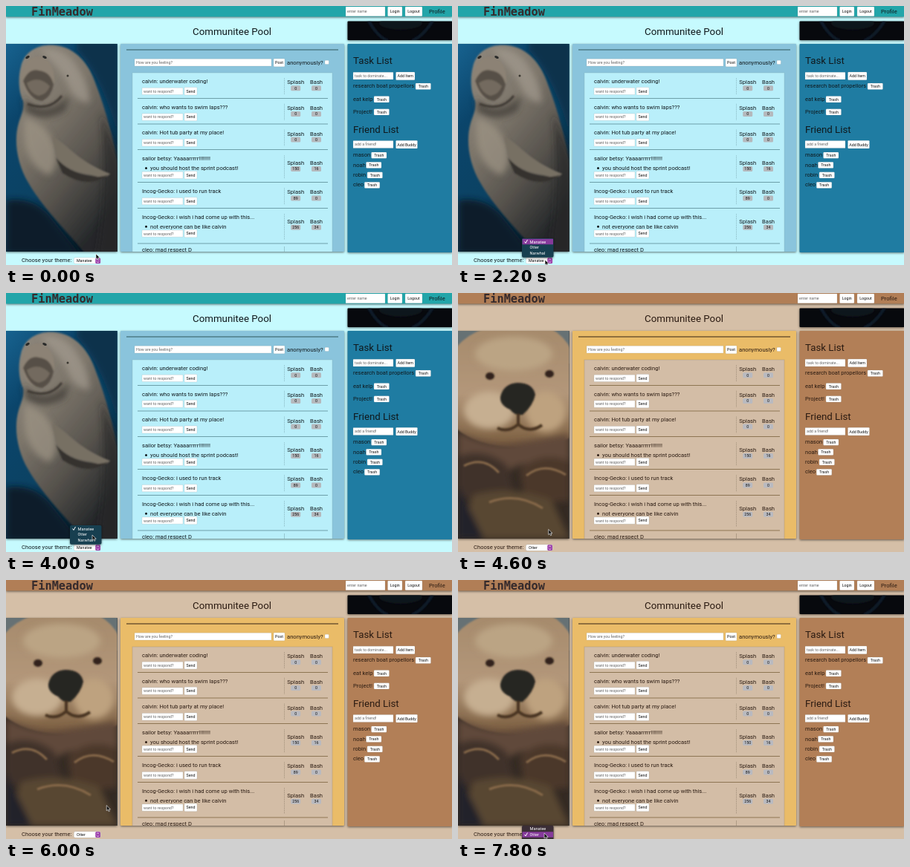
Recreate the animation shown at these times as an HTML page. Size 600x349 px, loop 8000 ms.

```html
<!DOCTYPE html>
<html lang="en">
<head>
<meta charset="utf-8">
<title>Animal themes</title>
<style>
html, body { margin: 0; width: 100%; height: 100%; overflow: hidden; }
svg { display: block; width: 100%; height: 100%; font-family: Roboto, sans-serif;
  --page: #c6fafe; --bar: #22a5a9; --pool: #8ac4dc; --feed: #b9effa; --side: #1f7ca2;
  --ink: #10191d; --rule: #4d7d87; --line: #7eabb5; --badge: #b5b9bd; --menu: #173f50; }
svg.otter {
  --page: #d5bfa7; --bar: #b17e56; --pool: #eabc68; --feed: #d3bda6; --side: #b27f57;
  --ink: #2b1b12; --rule: #705630; --line: #96836f; --badge: #b9bac0; --menu: #3b2e36; }
text { fill: var(--ink); font-size: 7.6px; white-space: pre; }
.title { font-size: 13.3px; }
.small { font-size: 5.3px; fill: #111; }
.hint { font-size: 5.3px; fill: #666; }
.brand { font: bold 15.3px "DejaVu Sans Mono", monospace; fill: #352a2c; }
.item { font-size: 5.6px; fill: #fff; }
.box { fill: #fff; stroke: #8b979b; stroke-opacity: .4; stroke-width: .5; }
.panel { filter: drop-shadow(0 1px 1.5px #0008); }
.otter #manatee, svg:not(.otter) #otter { display: none; }
</style>
</head>
<body>
<svg id="stage" viewBox="0 0 600 349" preserveAspectRatio="none">
  <defs>
    <clipPath id="photoClip"><path d="M0 51H149.500V331H0z"/></clipPath>
    <clipPath id="poolClip"><path d="M154 51H455V331H154z"/></clipPath>
    <clipPath id="stripClip"><rect x="459.500" y="20.500" width="141" height="25.500" rx="1"/></clipPath>
    <filter id="soft" x="-30%" y="-30%" width="160%" height="160%"><feGaussianBlur stdDeviation="4"/></filter>
    <filter id="edge"><feGaussianBlur stdDeviation=".8"/></filter>
    <linearGradient id="water" x2=".6" y2="1">
      <stop stop-color="#17628f"/><stop offset=".3" stop-color="#0b456b"/>
      <stop offset=".65" stop-color="#0b4263"/><stop offset="1" stop-color="#071a26"/>
    </linearGradient>
    <linearGradient id="hide" x2=".6" y2="1">
      <stop stop-color="#8f887d"/><stop offset=".4" stop-color="#7d766b"/>
      <stop offset=".7" stop-color="#57534d"/><stop offset="1" stop-color="#25282a"/>
    </linearGradient>
    <linearGradient id="fur" x2="0" y2="1">
      <stop stop-color="#a58a6b"/><stop offset=".55" stop-color="#b3977a"/><stop offset="1" stop-color="#775a3c"/>
    </linearGradient>
  </defs>

  <rect width="600" height="349" style="fill:var(--page)"/>
  <rect class="panel" width="600" height="14.500" style="fill:var(--bar)"/>

  <rect class="panel" y="51" width="149.500" height="280" fill="#083b5c"/>
  <g clip-path="url(#photoClip)">
    <g id="manatee">
      <path d="M0 51H150V331H0z" fill="url(#water)"/>
      <g filter="url(#soft)">
        <path d="M95 45H155V190Q130 95 95 60z" fill="#08304c"/>
        <path d="M0 262Q40 255 65 290L100 335H0z" fill="#081d2a"/>
      </g>
      <g filter="url(#edge)">
        <path d="M20 82C25 58 48 51 66 53C94 56 112 78 121 106C134 139 145 180 150 215V335H108C82 304 48 270 30 238C15 213 10 181 17 158C20 148 25 139 23 128C17 116 16 97 20 82z" fill="url(#hide)"/>
      </g>
      <g filter="url(#soft)">
        <path d="M45 58Q78 53 96 82T112 130Q93 130 84 108T45 58z" fill="#a39b8f" opacity=".7"/>
        <path d="M25 150Q58 160 66 190Q72 216 58 228Q18 211 25 150z" fill="#9c9385" opacity=".75"/>
        <path d="M128 145L155 210V335H122Q137 255 128 145z" fill="#25282a" opacity=".6"/>
        <path d="M23 124Q52 154 86 119L80 141Q52 159 27 143z" fill="#3d3933" opacity=".7"/>
      </g>
      <g filter="url(#edge)">
        <ellipse cx="43" cy="97" rx="22" ry="29" fill="#8c8275"/>
        <path d="M23 101Q31 83 45 87Q60 89 64 106Q61 122 49 128Q32 128 23 101z" fill="#575047"/>
        <path d="M28 104Q44 93 59 108Q55 119 44 121Q32 118 28 104z" fill="#736a5f"/>
        <path d="M29 132Q58 143 75 121" fill="none" stroke="#403b35" stroke-width="3"/>
        <path d="M62 176C83 185 92 207 140 226Q135 234 115 228Q83 224 68 204z" fill="#777064"/>
        <path d="M67 204Q83 225 115 229Q128 232 138 227Q111 248 76 225z" fill="#35332f"/>
      </g>
      <ellipse cx="29" cy="69" rx="3" ry="1.600" fill="#292a29" transform="rotate(-30 29 69)"/>
      <ellipse cx="52" cy="69" rx="3" ry="1.600" fill="#292a29" transform="rotate(25 52 69)"/>
      <circle cx="83" cy="94" r="1.500" fill="#393630"/>
    </g>
    <g id="otter">
      <path d="M0 51H150V331H0z" fill="#342a23"/>
      <path d="M0 51H150V95H0z" fill="#667174"/>
      <path d="M-5 76Q18 48 55 44H115Q146 54 158 90V190Q125 214 78 208Q22 207-5 180z" fill="url(#fur)" filter="url(#edge)"/>
      <g filter="url(#soft)">
        <ellipse cx="75" cy="82" rx="52" ry="23" fill="#bba484"/>
        <ellipse cx="42" cy="158" rx="34" ry="25" fill="#c6af91"/>
        <ellipse cx="118" cy="160" rx="27" ry="27" fill="#bea27f"/>
        <path d="M0 186Q38 207 75 202T150 190V235Q95 222 72 237T0 222z" fill="#60493a"/>
        <path d="M0 220Q35 207 66 232L75 270Q35 293 0 270z" fill="#413329"/>
        <path d="M83 237Q115 211 150 227V280Q111 285 88 269z" fill="#4c3929"/>
        <path d="M20 272Q72 258 126 279L150 331H0z" fill="#594633"/>
        <path d="M0 260L35 331H0z" fill="#20242a"/>
      </g>
      <g filter="url(#edge)">
        <path d="M57 140Q61 122 80 121Q101 121 104 137Q101 152 87 164Q77 166 70 157Q56 151 57 140z" fill="#282523"/>
        <path d="M81 163V177M53 182Q67 189 81 177Q96 190 113 178" fill="none" stroke="#493522" stroke-width="4"/>
        <ellipse cx="43" cy="112" rx="6" ry="5" fill="#30241b"/>
        <ellipse cx="123" cy="109" rx="6" ry="5" fill="#30241b"/>
        <path d="M8 233Q34 219 55 242M92 246Q116 227 145 245M42 282Q79 268 114 290" fill="none" stroke="#87694a" stroke-width="3"/>
      </g>
    </g>
  </g>

  <rect class="panel" x="459.500" y="20.500" width="141" height="25.500" rx="1" fill="#07090d"/>
  <g clip-path="url(#stripClip)" filter="url(#edge)">
    <path d="M488 20Q500 42 514 47M574 20Q561 41 546 47" fill="none" stroke="#111a2a" stroke-width="4"/>
    <ellipse cx="531" cy="23" rx="29" ry="9" fill="#11121a"/>
  </g>
  <rect class="panel" x="154" y="51" width="301" height="280" rx="1" style="fill:var(--pool)"/>
  <rect class="panel" x="459.500" y="51" width="141" height="281" rx="1" style="fill:var(--side)"/>
  <g id="page"></g>
  <g id="menu">
    <rect class="panel" x="86" y="313" width="42.500" height="25.800" rx="2" style="fill:var(--menu)"/>
    <rect id="highlight" x="86.500" width="41.500" height="7.500" fill="#863a9b"/>
    <g id="items"></g>
    <path id="check" d="M89.500 317.500l1.500 2 2.500-4.500" fill="none" stroke="#fff"/>
  </g>
  <path id="cursor" d="M0 0V7.200L1.700 5.700 2.900 8.300 4.200 7.700 3 5.200H5.300z" fill="#111" stroke="#fff" stroke-width=".6"/>
</svg>
<script>
const $ = id => document.getElementById(id);
const text = (x, y, words, cls = '', anchor = 'start') =>
  `<text x="${x}" y="${y}" class="${cls}" text-anchor="${anchor}">${words}</text>`;
const box = (x, y, w, h, r = 1) =>
  `<rect class="box" x="${x}" y="${y}" width="${w}" height="${h}" rx="${r}"/>`;
const field = (x, y, w, h, hint) => box(x, y, w, h, .5) + text(x + 2, y + h / 2 + 1.9, hint, 'hint');
const button = (x, y, w, h, label) =>
  box(x, y, w, h) + text(x + w / 2, y + h / 2 + 1.9, label, 'small', 'middle');
const rule = (x1, y1, x2, y2, color, extra = '') =>
  `<path d="M${x1} ${y1}L${x2} ${y2}" style="stroke:var(--${color});${extra}"/>`;

function counter(x, y, label, value) {
  return text(x, y, label, '', 'middle') +
    `<rect x="${x - 6.5}" y="${y + 2}" width="13" height="7" rx="1.5" style="fill:var(--badge)"/>` +
    text(x, y + 7.4, value, 'small', 'middle');
}

function post({ y, words, splash, bash, reply, end }) {
  const inputY = y + (reply ? 15 : 6.2), countY = y + (reply ? 5.8 : 1.2);
  return text(183, y, words) +
    (reply ? `<circle cx="188.500" cy="${y + 10.2}" r="1.500" style="fill:var(--ink)"/>` + text(194, y + 12.6, reply) : '') +
    field(183, inputY, 55, 9.3, 'want to respond?') + button(240, inputY - .7, 17, 10.5, 'Send') +
    rule(374.5, y - 7, 374.5, end - 5, 'line', 'stroke-width:.6;stroke-dasharray:1 .5') +
    counter(389.7, countY, 'Splash', splash) + counter(417.5, countY, 'Bash', bash) +
    rule(177, end, 433, end, 'rule', 'stroke-width:.7');
}

const posts = [
  { y: 104, end: 124.5, words: 'calvin: underwater coding!', splash: 0, bash: 0 },
  { y: 138.7, end: 159, words: 'calvin: who wants to swim laps???', splash: 0, bash: 0 },
  { y: 173.4, end: 193.5, words: 'calvin: Hot tub party at my place!', splash: 0, bash: 0 },
  { y: 208.2, end: 237.5, words: 'sailor betsy: Yaaaarrrrr!!!!!!!!', splash: 150, bash: 16, reply: 'you should host the sprint podcast!' },
  { y: 252.2, end: 272.5, words: 'Incog-Gecko: i used to run track', splash: 89, bash: 0 },
  { y: 287, end: 320, words: 'Incog-Gecko: i wish i had come up with this...', splash: 256, bash: 34, reply: 'not everyone can be like calvin' }
];
const entries = [
  ['research boat propellors', 110.3, 551], ['eat kelp', 127.8, 495], ['Project!', 145, 495],
  ['mason', 203.2, 491.5], ['noah', 216.5, 484.5], ['robin', 230, 486], ['cleo', 243.4, 482.3]
];

$('page').innerHTML =
  text(34, 13, 'FinMeadow', 'brand') +
  field(457, 1, 53, 12.7, 'enter name') + button(513.5, 1, 19.5, 12.7, 'Login') +
  button(537, 1, 23, 12.7, 'Logout') + text(569, 10, 'Profile') +
  text(304, 39, 'Communitee Pool', 'title', 'middle') +
  rule(162, 59, 447, 59, 'rule', 'stroke-width:1.3') +
  field(173, 71.3, 184, 9.7, 'How are you feeling?') + button(360, 71, 15, 10.8, 'Post') +
  text(378, 79, 'anonymously?') + box(429, 73.2, 5.3, 5.3) +
  `<g clip-path="url(#poolClip)">
    <rect x="170" y="90" width="269" height="245" style="fill:var(--feed);stroke:var(--line);stroke-opacity:.35"/>` +
    posts.map(post).join('') + text(183, 331, 'cleo: mad respect D') +
    rule(374.5, 324, 374.5, 331, 'line', 'stroke-width:.6') + '</g>' +
  text(467, 78.3, 'Task List', 'title') + field(467, 89.3, 54, 9.8, 'task to dominate...') +
  button(524.5, 89, 25.5, 10.7, 'Add Item') +
  text(467, 171, 'Friend List', 'title') + field(467, 181.6, 54, 9.8, 'add a friend!') +
  button(524.5, 181.3, 29, 10.7, 'Add Buddy') +
  entries.map(([label, y, x]) => text(467, y, label) + button(x, y - 6.2, 20.5, 8.3, 'Trash')).join('') +
  text(21, 345, 'Choose your theme:') + box(91.3, 339, 36, 8.3, 2) +
  '<text id="choice" x="95" y="345" class="small"></text>' +
  `<rect x="120.300" y="339.300" width="6.700" height="7.700" rx="1.500" fill="#9a3ca9"/>
   <path d="M122 342.500l1.600-1.800 1.600 1.800M122 344.200l1.600 1.800 1.600-1.800" fill="none" stroke="#fff" stroke-width=".7"/>`;

$('items').innerHTML = ['Manatee', 'Otter', 'Narwhal']
  .map((name, i) => text(96.5, 319.5 + i * 7.7, name, 'item')).join('');

const LOOP = 8000, STEP = 200;
const MENU_OPEN = 1600, PICKED = 4200, MENU_REOPEN = 7600;
const path = [
  [0, 121, 334], [1000, 117, 342], [2600, 117, 342], [3600, 116, 326],
  [4200, 116, 326], [5400, 138, 297], [6800, 131, 314], [7600, 116, 341], [LOOP, 116, 341]
];

function cursorAt(t) {
  const i = path.findIndex(p => p[0] > t);
  const [t0, x0, y0] = path[i - 1], [t1, x1, y1] = path[i];
  const u = (t - t0) / (t1 - t0), ease = u * u * (3 - 2 * u);
  return [x0 + (x1 - x0) * ease, y0 + (y1 - y0) * ease];
}

function draw(now) {
  const t = Math.floor(now % LOOP / STEP) * STEP;
  const otter = t >= PICKED, chosen = otter ? 1 : 0;
  const open = t >= MENU_OPEN && t < PICKED || t >= MENU_REOPEN;
  const [x, y] = cursorAt(t);
  const hovered = otter || y < 334 ? 1 : 0;
  const blink = t === PICKED - STEP;

  $('stage').setAttribute('class', otter ? 'otter' : '');
  $('choice').textContent = otter ? 'Otter' : 'Manatee';
  $('menu').setAttribute('visibility', open ? 'visible' : 'hidden');
  $('menu').setAttribute('transform', `translate(0 ${otter ? 17.8 : 0})`);
  $('highlight').setAttribute('y', 313.8 + hovered * 7.7);
  $('highlight').setAttribute('opacity', blink ? 0 : 1);
  $('check').setAttribute('transform', `translate(0 ${chosen * 7.7})`);
  $('cursor').setAttribute('transform', `translate(${x} ${y})`);
  requestAnimationFrame(draw);
}
requestAnimationFrame(draw);
</script>
</body>
</html>
```
